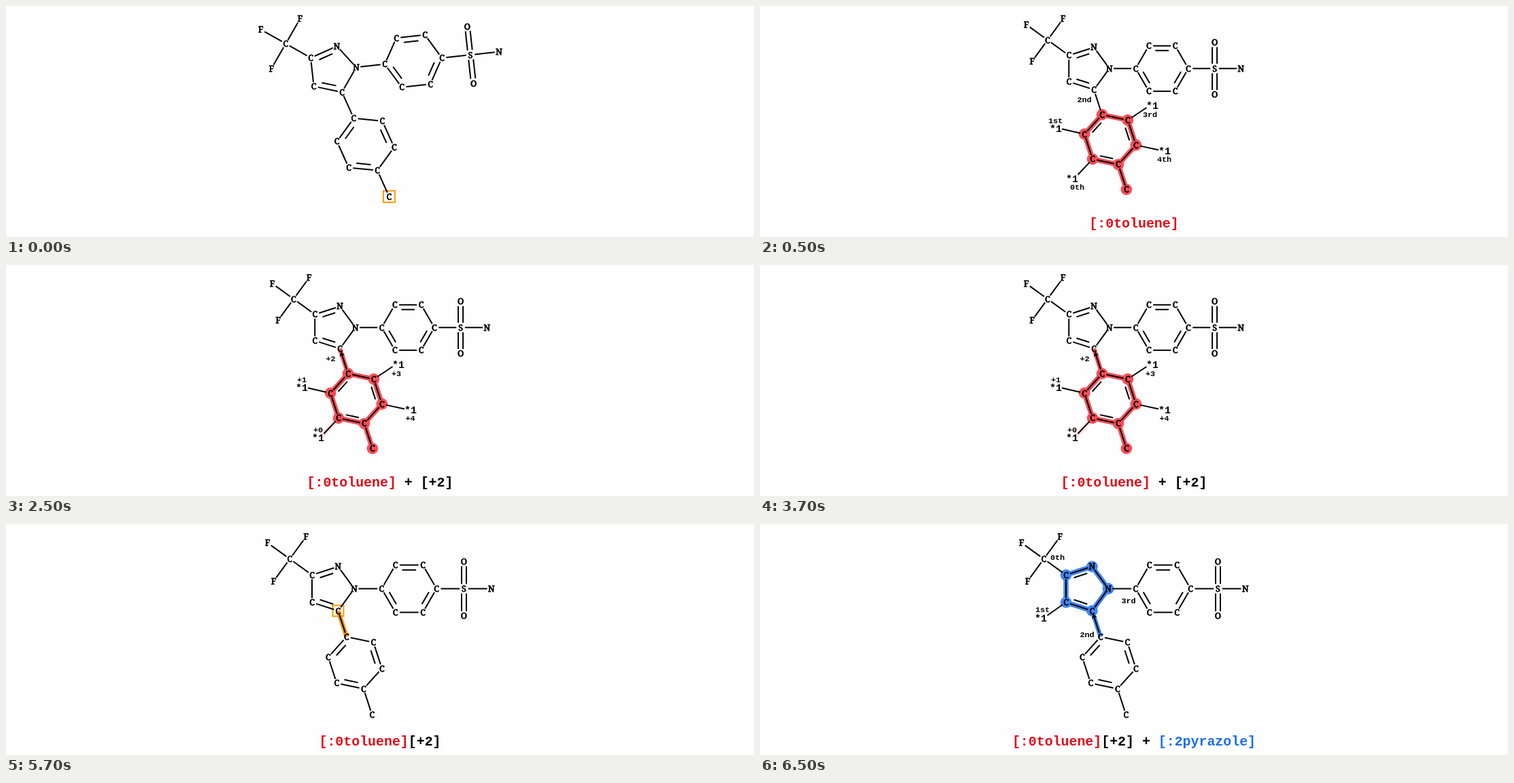
Animation of 1100 by 341 pixels, one loop 8 s. Source, as an HTML page:

```html
<!DOCTYPE html>
<html lang="en">
<head>
<meta charset="utf-8">
<title>Naming a molecule step by step</title>
<style>
  html, body { margin: 0; width: 100%; height: 100%; overflow: hidden; background: #fefefe; }
  svg { display: block; width: 1100px; height: 341px; }
  text { text-anchor: middle; white-space: pre; font: bold 15px "Liberation Mono", "Courier New", monospace; }
  .atom { font: 12.5px "Noto Serif", serif; stroke: #000; stroke-width: 0.8px; }
  .note { font-size: 11.8px; }
  .name { font-size: 19.9px; }
</style>
</head>
<body>
<svg id="stage" viewBox="0 0 1100 341"></svg>
<script>
const stage = document.getElementById('stage');
const RED = '#fc4e57', BLUE = '#4088f6', ORANGE = '#ff9800', PINK = '#ffe1e2';
const RED_TEXT = '#e30b17', BLUE_TEXT = '#1a6ef0';

function add(parent, tag, attrs, text) {
  const el = document.createElementNS('http://www.w3.org/2000/svg', tag);
  for (const key in attrs) el.setAttribute(key, attrs[key]);
  if (text) el.textContent = text;
  parent.append(el);
  return el;
}

// The molecule in units of one bond, with the first ring nitrogen at the origin.
const atoms = {}, bonds = [];
const step = ([x, y], deg, len = 1) => {
  const a = deg * Math.PI / 180;
  return [x + len * Math.cos(a), y + len * Math.sin(a)];
};
function grow(id, label, from, deg, order = 1) {
  atoms[id] = { label, at: step(atoms[from].at, deg) };
  bonds.push({ a: from, b: id, order });
}
function closeRing(ids, center, doubles) {
  ids.forEach((a, i) => bonds.push({
    a, b: ids[(i + 1) % ids.length], center, order: doubles.includes(i) ? 2 : 1
  }));
}
function benzene(prefix, from, deg) {
  const center = step(atoms[from].at, deg, 2), ids = [];
  for (let k = 0; k < 6; k++) {
    ids.push(prefix + k);
    atoms[prefix + k] = { label: 'C', at: step(center, deg + 180 + 60 * k) };
  }
  bonds.push({ a: from, b: prefix + 0, order: 1 });
  closeRing(ids, center, [1, 3, 5]);
  return ids;
}

const pentaR = 0.5 / Math.sin(Math.PI / 5);
const pyrazole = [...'NCCCN'].map((label, k) => {
  atoms['p' + k] = { label, at: step([-pentaR, 0], 72 * k, pentaR) };
  return 'p' + k;
});
closeRing(pyrazole, [-pentaR, 0], [1, 3]);
benzene('s', 'p0', 0);
const tolyl = benzene('t', 'p1', 72);
grow('me', 'C', 't3', 72);
grow('S', 'S', 's3', 0);
grow('Oa', 'O', 'S', 90, 2);
grow('Ob', 'O', 'S', -90, 2);
grow('Na', 'N', 'S', 0);
grow('cf', 'C', 'p3', 216);
[216, -54, 126].forEach((deg, i) => grow('F' + i, 'F', 'cf', deg));

const view = (x, y, size, deg = 0) => {
  const c = Math.cos(deg * Math.PI / 180) * size, s = Math.sin(deg * Math.PI / 180) * size;
  return { size, map: ([u, v]) => [x + c * u - s * v, y + s * u + c * v] };
};
const tilted = view(515, 90.5, 42.25, -6.25);
const small = view(513.8, 92.3, 38.7);
const medium = view(512.1, 95.5, 40.35);

function line(g, [x1, y1], [x2, y2], color = '#000', width = 2, cap = 'butt') {
  add(g, 'line', { x1, y1, x2, y2, stroke: color, 'stroke-width': width, 'stroke-linecap': cap });
}
// Line between two points, pulled in at both ends and moved sideways.
function inset(g, p, q, cut, shift = 0) {
  const dx = q[0] - p[0], dy = q[1] - p[1], len = Math.hypot(dx, dy);
  const ux = dx / len, uy = dy / len, ox = -uy * shift, oy = ux * shift;
  line(g, [p[0] + ux * cut + ox, p[1] + uy * cut + oy],
          [q[0] - ux * cut + ox, q[1] - uy * cut + oy]);
}
function drawBond(g, v, { a, b, order, center }) {
  const p = v.map(atoms[a].at), q = v.map(atoms[b].at);
  if (order === 2 && !center) {
    inset(g, p, q, 7, 3.5);
    inset(g, p, q, 7, -3.5);
    return;
  }
  inset(g, p, q, 6.3);
  if (order === 2) {
    const c = v.map(center);
    const side = Math.sign((q[0] - p[0]) * (c[1] - p[1]) - (q[1] - p[1]) * (c[0] - p[0]));
    inset(g, p, q, v.size * 0.245, side * v.size * 0.18);
  }
}
function label(g, cls, text, x, y, drop) {
  add(g, 'text', { class: cls, x, y: y + drop }, text);
}
function glow(g, v, ids, color) {
  for (const { a, b } of bonds)
    if (ids.includes(a) && ids.includes(b))
      line(g, v.map(atoms[a].at), v.map(atoms[b].at), color, 7.4);
  for (const id of ids) {
    const [cx, cy] = v.map(atoms[id].at);
    add(g, 'circle', { cx, cy, r: 8.4, fill: color });
  }
}
function box(g, v, id, size) {
  const [x, y] = v.map(atoms[id].at);
  add(g, 'rect', { x: x - size / 2, y: y - size / 2, width: size, height: size,
    fill: 'none', stroke: ORANGE, 'stroke-width': 2 });
}
function arrowHead(g, v) {
  const [x, y] = v.map(atoms.p1.at);
  add(g, 'path', { d: 'M4.5 0L11.5 -4L10 0L11.5 4Z', transform: `translate(${x} ${y}) rotate(72)` });
}

// Stars: atom, line end x, y, label x, y. Notes: text, x, y. Name: text and colour runs.
const stars = [['t4', 467.5, 249, 459, 255], ['t5', 444, 181.5, 435, 181.5],
               ['t1', 568.5, 150, 577, 147.5], ['t2', 586, 212.5, 595, 214]];
const toluene = ['[:0toluene]', RED_TEXT];
const scenes = [
  { until: 500, v: tilted, box: ['me', 17] },
  { until: 2500, v: small, glow: [[...tolyl, 'me'], RED], stars,
    notes: [['0th', 466.5, 267], ['1st', 434.5, 169], ['2nd', 477, 137.5],
            ['3rd', 573.5, 160], ['4th', 594.5, 226]],
    name: [toluene] },
  { until: 4500, v: small, glow: [[...tolyl, 'me'], RED], link: RED, arrow: true, stars, faint: true,
    notes: [['+0', 459, 242.5], ['+1', 435, 169], ['+2', 477.5, 137.5],
            ['+3', 574, 160], ['+4', 594.5, 226]],
    name: [toluene, [' + [+2]']] },
  { until: 6500, v: medium, link: ORANGE, box: ['p1', 16],
    name: [toluene, ['[+2]']] },
  { until: 8000, v: medium, glow: [pyrazole, BLUE], link: BLUE, arrow: true,
    stars: [['p2', 422.5, 135, 413, 139.5]],
    notes: [['0th', 437.5, 48.5], ['1st', 415.5, 126], ['2nd', 481, 162.5], ['3rd', 542, 113]],
    name: [toluene, ['[+2] + '], ['[:2pyrazole]', BLUE_TEXT]] }
];

function build(scene) {
  const g = add(stage, 'g', { visibility: 'hidden' }), v = scene.v;
  const at = id => v.map(atoms[id].at);
  if (scene.faint) line(g, at('t4'), [465, 252], PINK, 7, 'round');
  if (scene.link) line(g, at('p1'), at('t0'), scene.link, 6.5);
  if (scene.glow) glow(g, v, ...scene.glow);
  if (scene.box) box(g, v, ...scene.box);
  bonds.forEach(b => drawBond(g, v, b));
  if (scene.arrow) arrowHead(g, v);
  for (const id in atoms) label(g, 'atom', atoms[id].label, ...at(id), 4.4);
  for (const [id, x, y, tx, ty] of scene.stars || []) {
    const [ax, ay] = at(id), k = 6.3 / Math.hypot(x - ax, y - ay);
    line(g, [ax + (x - ax) * k, ay + (y - ay) * k], [x, y]);
    label(g, 'star', '*1', tx, ty, 4.8);
  }
  for (const [text, x, y] of scene.notes || []) label(g, 'note', text, x, y, 4);
  if (scene.name) {
    const t = add(g, 'text', { class: 'name', x: 550, y: 327 });
    for (const [text, fill = '#000'] of scene.name) add(t, 'tspan', { fill }, text);
  }
  return g;
}

const groups = scenes.map(build);
const start = performance.now();
function show() {
  const time = (performance.now() - start) % 8000;
  const now = scenes.findIndex(s => time < s.until);
  groups.forEach((g, i) => g.setAttribute('visibility', i === now ? 'visible' : 'hidden'));
  requestAnimationFrame(show);
}
show();
</script>
</body>
</html>
```
